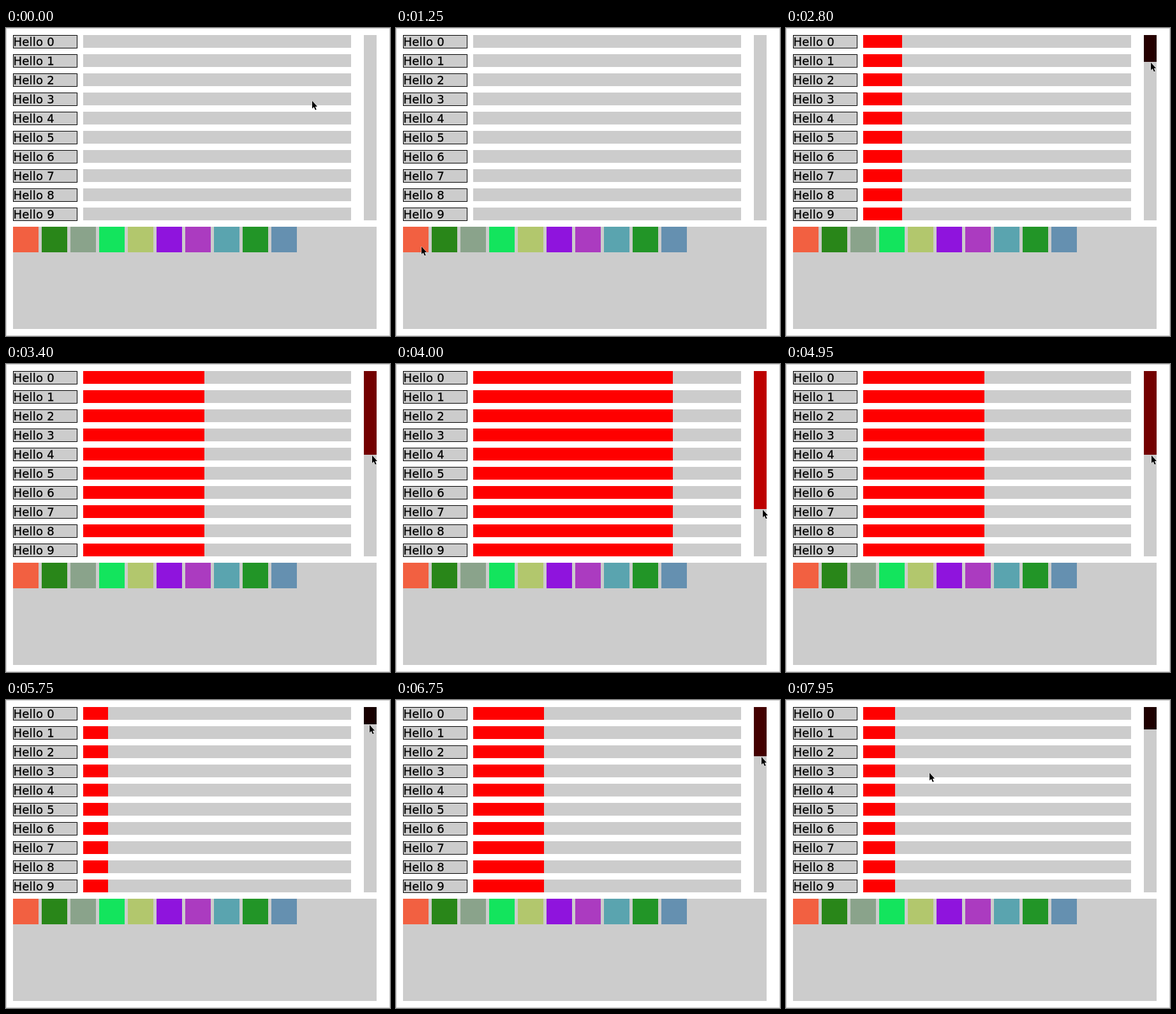
Write an HTML page that moves like this. It is 602x482 px and loops after 8000 ms.

```html
<!DOCTYPE html>
<html lang="en">
<head>
<meta charset="utf-8">
<title>Sliders</title>
<style>
  html, body { margin: 0; width: 100%; height: 100%; overflow: hidden; background: #fff; }
  svg { display: block; }
  text {
    font: 18px "DejaVu Sans", sans-serif;
    letter-spacing: 0.25px;
    stroke: #000;
    stroke-width: 0.3px;
  }
</style>
</head>
<body>
<svg id="stage" width="602" height="482" viewBox="0 0 602 482"></svg>
<script>
const LOOP = 8000, STEP = 50;
const GREY = '#ccc', RED = '#f00';
const TOP = 11, BAR_W = 420, SLIDER_H = 290;
const PRESS = 2500, RELEASE = 7300;
const swatches = ['#f26041', '#298619', '#8aa38b', '#13e45d', '#b2c76d',
  '#8f14dd', '#ab3bc0', '#5aa4af', '#229527', '#6590b0'];

const smooth = u => u * u * (3 - 2 * u);
const glide = u => u * (1.35 - 0.35 * u);

// The pointer rests between these moves
const home = { x: 479, y: 113 };
const moves = [
  { from: 450, to: 1250, x: 39, y: 341 },
  { from: 1300, to: 2150, x: 559, y: 87 },
  { from: 2150, to: PRESS, x: 571, y: 37.5 },
  { from: PRESS, to: 4250, x: 574, y: 238 },
  { from: 4400, to: 5900, x: 569, y: 23.5, ease: glide },
  { from: 5900, to: 6250, x: 572, y: 81 },
  { from: 6400, to: 6550, x: 572, y: 90 },
  { from: 6700, to: 7050, x: 577, y: 47.6 },
  { from: 7250, to: RELEASE, x: 577, y: 45.6 },
  { from: 7450, to: 7950, x: 224, y: 113 }
];

const stage = document.getElementById('stage');

function add(tag, attrs) {
  const el = document.createElementNS('http://www.w3.org/2000/svg', tag);
  for (const key in attrs) el.setAttribute(key, attrs[key]);
  return stage.appendChild(el);
}

const rect = (x, y, width, height, fill, extra) =>
  add('rect', { x, y, width, height, fill, ...extra });

rect(0.5, 0.5, 601, 481, '#fff', { stroke: GREY });
const bars = [];
for (let i = 0; i < 10; i++) {
  const y = TOP + i * 30;
  rect(11.5, y + 0.5, 100, 20, GREY, { stroke: '#000' });
  add('text', { x: 11.5, y: y + 17 }).textContent = 'Hello ' + i;
  rect(121, y, BAR_W, 20, GREY);
  bars.push(rect(121, y, 0, 20, RED));
}
rect(561, TOP, 20, SLIDER_H, GREY);
const slider = rect(561, TOP, 20, 0, '#000');
rect(11, 311, 570, 160, GREY);
swatches.forEach((c, i) => rect(11 + i * 45, 311, 40, 40, c));
const pointer = add('path', {
  d: 'M1 1V13L3.7 10.4L5.7 15H7.7L5.8 10H9Z',
  stroke: '#fff', 'stroke-width': 0.8, 'paint-order': 'stroke'
});

function pointerAt(t) {
  let { x, y } = home;
  for (const m of moves) {
    if (t <= m.from) break;
    const k = (m.ease || smooth)(Math.min((t - m.from) / (m.to - m.from), 1));
    x += (m.x - x) * k;
    y += (m.y - y) * k;
  }
  return { x, y };
}

function draw(t) {
  const { x, y } = pointerAt(t);
  pointer.setAttribute('transform', `translate(${Math.round(x)} ${Math.round(y)})`);
  const value = t < PRESS ? 0 : (pointerAt(Math.min(t, RELEASE)).y - TOP) / SLIDER_H;
  const width = Math.round(value * BAR_W);
  for (const bar of bars) bar.setAttribute('width', width);
  slider.setAttribute('height', Math.round(value * SLIDER_H));
  slider.setAttribute('fill', `rgb(${Math.floor(value * 255)} 0 0)`);
}

const start = performance.now();
function tick() {
  const t = (performance.now() - start) % LOOP;
  draw(Math.floor(t / STEP) * STEP);
  requestAnimationFrame(tick);
}
tick();
</script>
</body>
</html>
```
